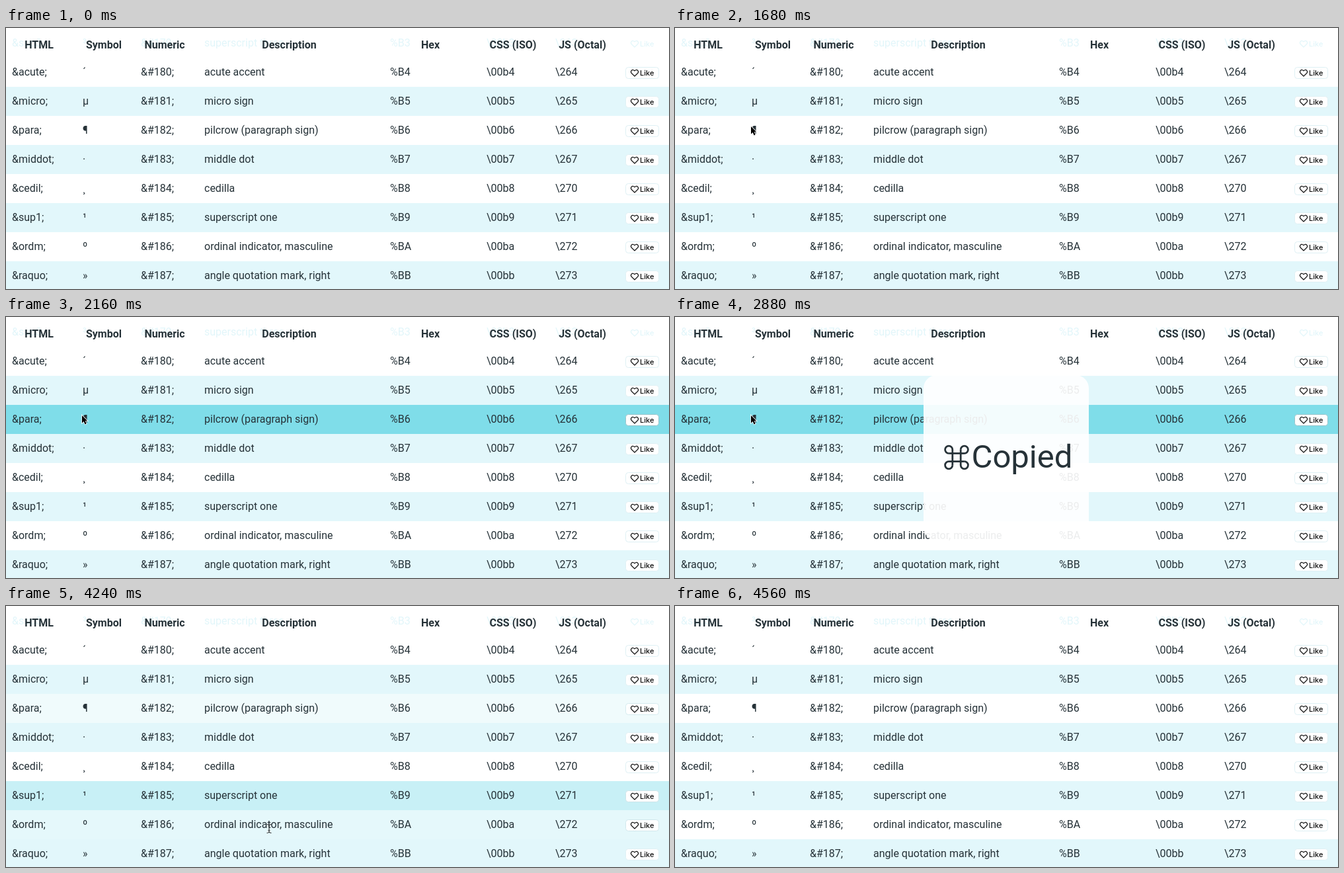
An HTML page with a canvas for the animation above (5.44 s loop, 1003 by 395 pixels).

```html
<!DOCTYPE html>
<html lang="en">
<head>
<meta charset="utf-8">
<title>Character reference table</title>
<style>
  html, body { margin: 0; width: 100%; height: 100%; overflow: hidden; background: #fff; }
  canvas { display: block; }
</style>
</head>
<body>
<canvas id="stage" width="1003" height="395"></canvas>
<script>
const ctx = document.getElementById('stage').getContext('2d');
const LOOP = 5440, STEP = 80;
const ROW_HEIGHT = 44, FIRST_ROW = 45;
const INK = '#263238', GHOST = '#e2f6fa';
const WHITE = [255, 255, 255], TINT = [226, 247, 251], HOVER = [127, 221, 233];

const COLUMNS = [9, 116, 204, 300, 581, 727, 831];
const HEADERS = [
  ['HTML', 50], ['Symbol', 148], ['Numeric', 240], ['Description', 428.5],
  ['Hex', 642], ['CSS (ISO)', 767], ['JS (Octal)', 872]
];
const ENTITIES = [
  ['sup3', 'superscript three'],
  ['acute', 'acute accent'],
  ['micro', 'micro sign'],
  ['para', 'pilcrow (paragraph sign)'],
  ['middot', 'middle dot'],
  ['cedil', 'cedilla'],
  ['sup1', 'superscript one'],
  ['ordm', 'ordinal indicator, masculine'],
  ['raquo', 'angle quotation mark, right']
];
const ROWS = ENTITIES.map(([name, description], i) => {
  const code = 179 + i, hex = code.toString(16);
  return [`&${name};`, String.fromCharCode(code), `&#${code};`, description,
    '%' + hex.toUpperCase(), '\\00' + hex, '\\' + code.toString(8)];
});

// Keyframes are [time, value, ...].
const HOVER_KEYS = {
  para: [[1760, 0], [2160, 1], [3920, 1], [4240, .12], [4320, 0]],
  middot: [[4000, 0], [4080, .2], [4240, 0]],
  cedil: [[4080, 0], [4160, .15], [4240, 0]],
  sup1: [[4080, 0], [4240, .26], [4400, 0]],
  ordm: [[4160, 0], [4240, .2], [4320, .25], [4480, 0]],
  raquo: [[4240, 0], [4400, .3], [4560, 0]]
};
const POINTER_KEYS = [
  [240, 553, 380], [320, 440, 330], [480, 200, 190], [560, 98, 151],
  [640, 100, 148], [720, 115, 149], [3920, 115, 149], [4000, 119, 156],
  [4080, 165, 188], [4160, 270, 262], [4240, 398, 337], [4320, 485, 370],
  [4400, 548, 391]
];
const POPUP_KEYS = [[2640, 0], [2880, 1]];

function sample(keys, time) {
  const next = keys.findIndex(key => key[0] > time);
  if (next === 0) return keys[0].slice(1);
  if (next < 0) return keys[keys.length - 1].slice(1);
  const a = keys[next - 1], b = keys[next];
  const p = (time - a[0]) / (b[0] - a[0]);
  return a.slice(1).map((v, i) => v + (b[i + 1] - v) * p);
}

const mix = (a, b, p) => `rgb(${a.map((v, i) => Math.round(v + (b[i] - v) * p))})`;

function write(text, x, y, font, color = INK, align = 'left') {
  ctx.font = font;
  ctx.fillStyle = color;
  ctx.textAlign = align;
  ctx.fillText(text, x, y);
}

function roundBox(x, y, w, h, r) {
  ctx.beginPath();
  ctx.roundRect(x, y, w, h, r);
}

function drawLike(y, ghost, hover) {
  const color = ghost ? GHOST : '#111';
  if (!ghost) {
    ctx.fillStyle = '#fff';
    ctx.strokeStyle = mix([222, 240, 244], [150, 195, 202], hover);
    ctx.lineWidth = 1;
    roundBox(937.5, y - 8.5, 50, 17, 4);
    ctx.fill();
    ctx.stroke();
  }
  ctx.save();
  ctx.translate(951, y);
  ctx.strokeStyle = color;
  ctx.lineWidth = 1.15;
  ctx.lineJoin = 'round';
  ctx.stroke(new Path2D('M0 5L-4.6 .5C-7-2-4.2-6.7 0-3.2C4.2-6.7 7-2 4.6 .5Z'));
  ctx.restore();
  write('Like', 959, y + 4, '500 11px Inter, sans-serif', color);
}

function drawRow(cells, index, time) {
  const top = FIRST_ROW + (index - 1) * ROW_HEIGHT;
  const ghost = index === 0;
  const keys = HOVER_KEYS[ENTITIES[index][0]];
  const hover = keys ? sample(keys, time)[0] : 0;
  if (!ghost) {
    ctx.fillStyle = mix(index % 2 ? WHITE : TINT, HOVER, hover);
    ctx.fillRect(0, top, 1003, ROW_HEIGHT);
  }
  cells.forEach((cell, i) =>
    write(cell, COLUMNS[i], top + 27, '16px Roboto, sans-serif', ghost ? GHOST : INK));
  drawLike(top + 23, ghost, hover);
}

function drawCommandSign(x, y) {
  const h = 6.2, r = 5.6, c = h + r;
  ctx.save();
  ctx.translate(x, y);
  ctx.strokeStyle = INK;
  ctx.lineWidth = 2.8;
  for (let i = 0; i < 4; i++) {
    ctx.beginPath();
    ctx.moveTo(h, -c);
    ctx.lineTo(h, c);
    ctx.arc(c, c, r, Math.PI, -Math.PI / 2, true);
    ctx.stroke();
    ctx.rotate(Math.PI / 2);
  }
  ctx.restore();
}

function drawPopup(time) {
  if (time < 2720 || time >= 3840) return;
  ctx.save();
  ctx.globalAlpha = sample(POPUP_KEYS, time)[0];
  ctx.fillStyle = 'rgba(255, 255, 255, .91)';
  roundBox(376, 88, 250, 250, 20);
  ctx.fill();
  drawCommandSign(426, 212.5);
  write('Copied', 448.5, 228, '49px Roboto, sans-serif');
  ctx.restore();
}

function drawPointer(time) {
  if (time < 240 || time > 4400) return;
  const [x, y] = sample(POINTER_KEYS, time);
  ctx.save();
  ctx.translate(x, y);
  if (x >= 300 && x <= 500) {
    ctx.strokeStyle = '#333';
    ctx.lineWidth = 1.1;
    ctx.stroke(new Path2D('M-3.5-6.5Q0-6.5 0-4Q0-6.5 3.5-6.5M0-4V4M-3.5 6.5Q0 6.5 0 4Q0 6.5 3.5 6.5M-1.5 2.5H1.5'));
  } else {
    const arrow = new Path2D('M0 0V11.5L2.7 9L4.6 13.4L6.6 12.5L4.8 8.3H8.2Z');
    ctx.strokeStyle = '#fff';
    ctx.lineWidth = 1.6;
    ctx.stroke(arrow);
    ctx.fillStyle = '#000';
    ctx.fill(arrow);
  }
  ctx.restore();
}

const start = performance.now();

function draw() {
  const elapsed = (performance.now() - start) % LOOP;
  const time = Math.floor(elapsed / STEP) * STEP;
  ctx.fillStyle = '#fff';
  ctx.fillRect(0, 0, 1003, 395);
  ROWS.forEach((cells, i) => drawRow(cells, i, time));
  HEADERS.forEach(([label, x]) =>
    write(label, x, 31, 'bold 16px Roboto, sans-serif', INK, 'center'));
  drawPopup(time);
  drawPointer(time);
  requestAnimationFrame(draw);
}
draw();
</script>
</body>
</html>
```
